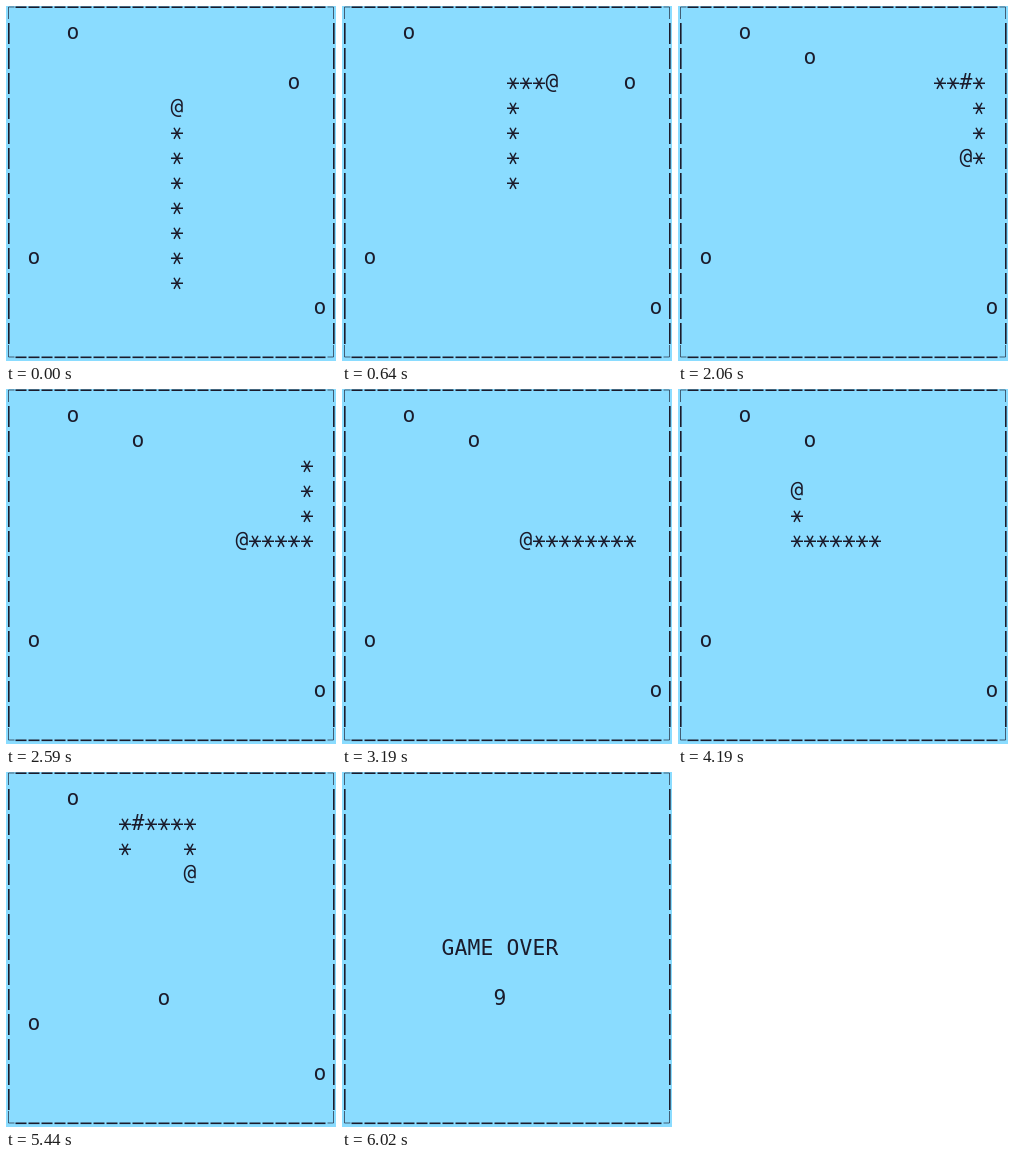
An HTML page with a canvas for the animation above (7.88 s loop, 330 by 355 pixels).

```html
<!DOCTYPE html>
<html lang="en">
<head>
<meta charset="utf-8">
<title>Text snake</title>
<style>
html, body { margin: 0; width: 100%; height: 100%; overflow: hidden; background: #8adcff; }
canvas { display: block; }
</style>
</head>
<body>
<canvas id="stage" width="330" height="355"></canvas>
<script>
const ctx = document.getElementById('stage').getContext('2d');
const LOOP = 7880;
const COLS = 26, ROWS = 15, CW = 13, CH = 25;
const PAPER = '#8adcff', INK = '#1b1b2b';
const DIRS = { U: [0, -1], D: [0, 1], L: [-1, 0], R: [1, 0] };
const ROUTE = 'U1 R10 D3 L14 U4 R5 D2 L2 U1';

const colX = c => 2 + CW * c;
const baseY = r => 8 + CH * r;
const same = (a, b) => a[0] === b[0] && a[1] === b[1];

// A step takes two or three 59 ms ticks
const stepTime = i => 59 * (1 + 2 * i + Math.ceil((i - 0.88) / 2.53)) - 7;

const moves = ROUTE.split(' ').map(s => s[0].repeat(s.slice(1))).join('');
const OVER = stepTime(moves.length);

function simulate() {
  let snake = Array.from({ length: 8 }, (_, i) => [13, 4 + i]);
  let food = [[5, 1], [22, 3], [2, 10], [24, 12]];
  let eaten = [];
  const spawns = [[10, 2], [12, 9]];
  const states = [{ snake, food, eaten }];
  for (const m of moves) {
    const [dx, dy] = DIRS[m];
    const head = [snake[0][0] + dx, snake[0][1] + dy];
    const tail = snake[snake.length - 1];
    const grows = eaten.some(e => same(e, tail));
    snake = [head, ...(grows ? snake : snake.slice(0, -1))];
    if (grows) eaten = eaten.filter(e => !same(e, tail));
    if (food.some(f => same(f, head))) {
      food = [...food.filter(f => !same(f, head)), spawns.shift()];
      eaten = [...eaten, head];
    }
    states.push({ snake, food, eaten });
  }
  return states;
}
const states = simulate();

function stateAt(t) {
  let n = 0;
  while (n < moves.length && stepTime(n) <= t) n++;
  return states[n];
}

function glyph(ch, c, r) {
  ctx.fillText(ch, colX(c), baseY(r));
}

function write(text, c, r) {
  [...text].forEach((ch, i) => glyph(ch, c + i, r));
}

// Six-armed asterisk with a level bar
function star(c, r) {
  const x = colX(c), y = baseY(r) - 5.7;
  ctx.lineWidth = 1.5;
  ctx.beginPath();
  for (let i = 0; i < 3; i++) {
    const a = i * Math.PI / 3, dx = 6 * Math.cos(a), dy = 6.4 * Math.sin(a);
    ctx.moveTo(x - dx, y - dy);
    ctx.lineTo(x + dx, y + dy);
  }
  ctx.stroke();
}

function border() {
  const left = 2, right = colX(COLS - 1), bottom = 350.5, w = 1.6;
  for (let c = 1; c < COLS - 1; c++) {
    for (const y of [0.4, bottom]) ctx.fillRect(colX(c) - 5.5, y, 11, w);
  }
  for (let r = 1; r < ROWS - 1; r++) {
    for (const x of [left, right]) ctx.fillRect(x, CH * r - 8, w, 21);
  }
  ctx.lineWidth = 1;
  ctx.globalAlpha = 0.65;
  for (const [x, sx] of [[left + 0.5, 1], [right + 0.5, -1]]) {
    for (const [y, sy] of [[1, 1], [bottom + 0.5, -1]]) {
      ctx.beginPath();
      ctx.moveTo(x + 6 * sx, y);
      ctx.lineTo(x, y);
      ctx.lineTo(x, y + 12 * sy);
      ctx.stroke();
    }
  }
  ctx.globalAlpha = 1;
}

function draw(t) {
  ctx.fillStyle = PAPER;
  ctx.fillRect(0, 0, 330, 355);
  ctx.fillStyle = ctx.strokeStyle = INK;
  ctx.font = '21.3px "DejaVu Sans Mono", monospace';
  ctx.textAlign = 'center';
  border();
  if (t >= OVER) {
    write('GAME OVER', 8, 7);
    glyph('9', 12, 9);
    return;
  }
  const { snake, food, eaten } = stateAt(t);
  food.forEach(f => glyph('o', ...f));
  snake.forEach((p, i) => {
    if (i === 0) glyph('@', ...p);
    else if (eaten.some(e => same(e, p))) glyph('#', ...p);
    else star(...p);
  });
}

const begin = performance.now();
function tick() {
  draw((performance.now() - begin) % LOOP);
  requestAnimationFrame(tick);
}
draw(0);
requestAnimationFrame(tick);
</script>
</body>
</html>
```
